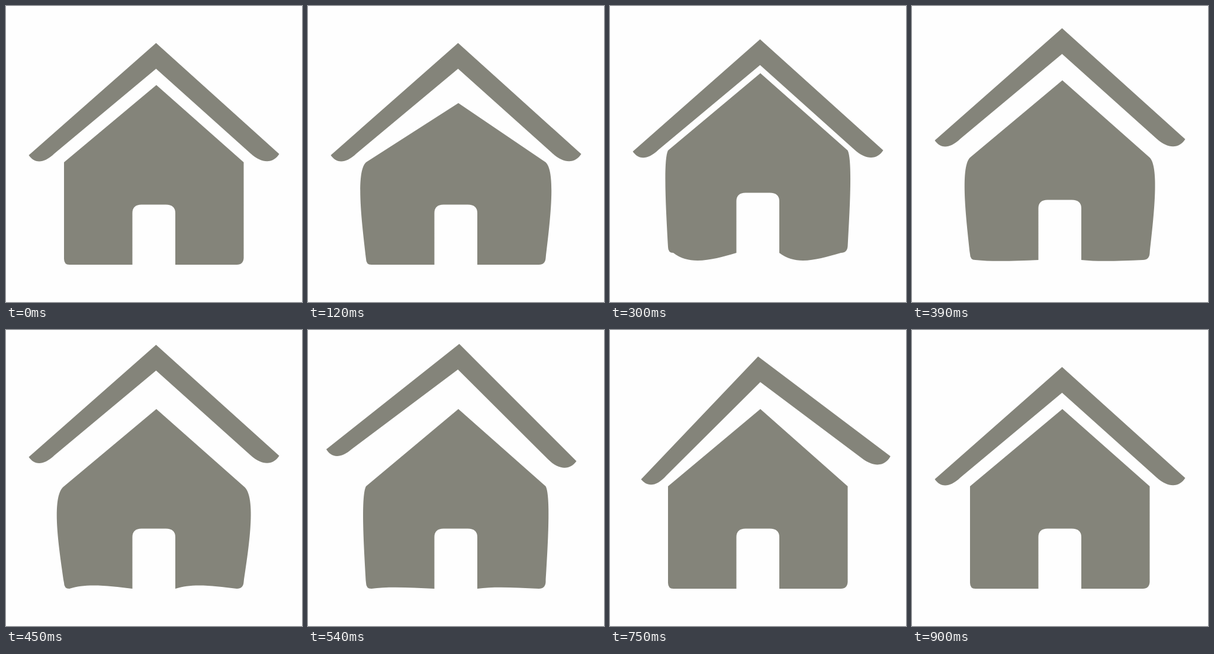
These frames come from a looping animation (500 by 500 pixels, 960 ms). An HTML page:

```html
<!DOCTYPE html>
<html lang="en">
<head>
<meta charset="utf-8">
<title>Bouncing house</title>
<style>
  html, body { margin: 0; width: 100%; height: 100%; overflow: hidden; background: #fefefe; }
  svg { display: block; width: 100%; height: 100%; fill: #84847a; }
</style>
</head>
<body>
<svg viewBox="0 0 500 500">
  <path id="body"/>
  <path id="roof" d="M253.5 62.5 L461.5 250 C452 265 434 268 413 249 L253.5 106 L82 249 C60 270 46 263 38.5 252Z"/>
</svg>
<script>
const LOOP = 960, STEP = 30, END = 900;
const body = document.getElementById('body');
const roof = document.getElementById('roof');

// Each track is a list of [time, value] keys joined by straight lines.
const tracks = {
  jump:   [[0, 0], [150, 0], [300, -20], [450, 0], [END, 0]],
  squash: [[0, 0], [150, 38], [300, 0], [END, 0]],
  bulge:  [[0, 0], [150, 12], [300, 4.5], [450, 12], [600, 0], [END, 0]],
  sag:    [[0, 0], [150, 0], [300, 14], [450, -6], [600, 0], [END, 0]],
  lift:   [[0, 0], [270, 0], [450, -37.5], [600, -40.2], [750, -18], [END, 0]],
  tilt:   [[0, 0], [450, 0], [600, 5], [750, -5], [END, 0]]
};

function valueAt(keys, t) {
  const i = Math.max(1, keys.findIndex(key => key[0] >= t));
  const [t0, v0] = keys[i - 1], [t1, v1] = keys[i];
  return v0 + (v1 - v0) * (t - t0) / (t1 - t0);
}

function bodyPath(squash, bulge, sag) {
  const high = 1.9 * bulge, low = 0.67 * bulge;
  const near = 437 + 1.6 * sag, far = 437 + 0.8 * sag;
  return `M254 ${133.5 + squash} L401.5 264
    C${401.5 + high} 281 ${401.5 + low} 371 401.5 426
    Q400.5 437 390 437
    C350 ${far} 315 ${near} 286 437
    V350 Q286 335.5 270 335.5 H229 Q213.5 335.5 213.5 350 V437
    C175 ${far} 135 ${near} 107 437
    Q98 437 98 427
    C${98 - low} 371 ${98 - high} 281 98 264Z`;
}

function draw(now) {
  const t = Math.min(END, Math.floor(now % LOOP / STEP) * STEP);
  const at = name => valueAt(tracks[name], t);
  body.setAttribute('d', bodyPath(at('squash'), at('bulge'), at('sag')));
  body.setAttribute('transform', `translate(0 ${at('jump')})`);
  roof.setAttribute('transform', `translate(0 ${at('lift')}) rotate(${at('tilt')} 253.5 101)`);
}

let start;
function tick(now) {
  start ??= now;
  draw(now - start);
  requestAnimationFrame(tick);
}
draw(0);
requestAnimationFrame(tick);
</script>
</body>
</html>
```
